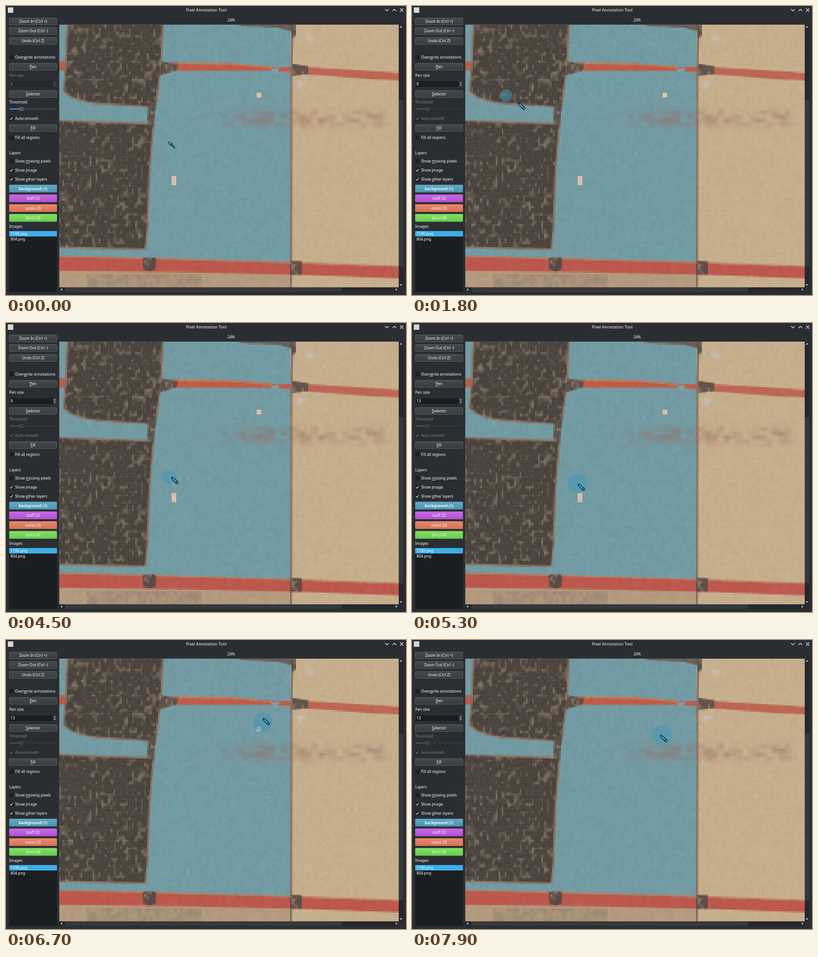
These frames come from a looping animation (879x637 px, 8000 ms). An HTML page with a canvas:

```html
<!DOCTYPE html>
<html lang="en">
<head>
<meta charset="utf-8">
<title>Pixel Annotation Tool</title>
<style>
  html, body { margin: 0; width: 100%; height: 100%; overflow: hidden; background: #2a2e32; }
  canvas, svg { position: absolute; left: 0; top: 0; }
  canvas { left: 117px; top: 41px; }
  text { font: 8.4px "Noto Sans", sans-serif; fill: #fcfcfc; }
  .title { font-size: 9px; }
  .bold { font-weight: bold; }
  .mid { text-anchor: middle; }
  .off { opacity: .4; filter: grayscale(1); }
  .line { fill: none; stroke: #fcfcfc; stroke-width: 1.2; }
</style>
</head>
<body>
<canvas id="view" width="746" height="579"></canvas>
<svg id="ui" width="879" height="637" viewBox="0 0 879 637"></svg>
<script>
const CELL = 10 / 3, LEFT = 117, TOP = 41, COLS = 224, ROWS = 174;
const $ = id => document.getElementById(id);

// ---- annotated picture ----
const hash = (x, y) => {
  const s = Math.sin(x * 127.1 + y * 311.7) * 43758.5453;
  return s - Math.floor(s);
};
const mix = (a, b, k) => a + (b - a) * k;
const clamp = v => Math.max(0, Math.min(1, v));
function noise(x, y) {
  const i = Math.floor(x), j = Math.floor(y);
  const u = x - i, v = y - j;
  return mix(mix(hash(i, j), hash(i + 1, j), u), mix(hash(i, j + 1), hash(i + 1, j + 1), u), v);
}

function paintRegions(g) {
  const fill = (color, d, edge, width) => {
    const path = new Path2D(d);
    g.fillStyle = color;
    g.fill(path);
    if (edge) stroke(edge, width, path);
  };
  const stroke = (color, width, d) => {
    g.strokeStyle = color;
    g.lineWidth = width;
    g.stroke(new Path2D(d));
  };
  g.setTransform(.3, 0, 0, .3, -LEFT * .3, -TOP * .3);
  fill('#6daab8', 'M90 20H640V640H90Z');
  fill('#eac796', 'M626 20H890V650H626Z');
  g.filter = 'blur(.5px)';
  fill('#5f4e40', 'M470 30H630V57L600 48L520 44Z');
  fill('#32281f', 'M135 30H345L341 130L328 224L300 221L200 215Q140 207 126 186L131 130Z', '#94725a', 4);
  fill('#32281f', 'M90 252L312 259L324 260L315 370L311 490L306 536L200 534L90 531Z', '#94725a', 4);
  fill('#493a2e', 'M313 218L331 205L324 266L310 262Z');
  fill('#de4a2f', 'M360 125L500 127L600 135L626 134V146L580 143L360 143Z');
  stroke('#e2874c', 3, 'M380 126L500 128L585 136');
  fill('#7fabb4', 'M581 138L600 135L597 149L584 147Z');
  fill('#de5a40', 'M655 134L760 140L880 148V165L800 161L655 150Z');
  fill('#d2503a', 'M100 122H131V142H100Z');
  fill('#4a372c', 'M338 121L378 130L374 142L338 153Z');
  fill('#583f32', 'M628 127L664 133V149L628 154Z');
  fill('#d0a880', 'M90 578L626 588V640H90Z');
  stroke('#795a45', 4, 'M630 30L627 150V300L626 640');
  fill('#4a3b30', 'M625 30H637V64L628 72Z');
  fill('#db4535', 'M90 551L300 556L626 566L890 576V601L626 592L400 587L90 583Z');
  stroke('#dc7c4c', 3, 'M90 551L300 556L626 565L890 575');
  fill('#43302a', 'M300 557Q315 550 330 557L328 581Q315 589 302 580Z');
  fill('#4d352c', 'M624 562L650 563V592H624Z');
}

function addTexture(g) {
  const img = g.getImageData(0, 0, COLS, ROWS), px = img.data;
  for (let r = 0; r < ROWS; r++) for (let c = 0; c < COLS; c++) {
    const k = (r * COLS + c) * 4, x = LEFT + c * CELL, y = TOP + r * CELL;
    const dark = px[k] < 90 && px[k + 2] < 90;
    const n = noise(c / 2, r / 2.4), grain = hash(c + 7, r + 3) - .5;
    const speck = dark ? Math.max(0, n - .57) * 190 + grain * 16 : (n - .5) * 9 + grain * 7;
    const tint = [1, .87, .68];
    const scrawl = Math.exp(-(((y - 246) / 17) ** 2)) * clamp((x - 405) / 110) * clamp((850 - x) / 30);
    const smear = scrawl * clamp(noise(c / 4, r / 3 + 40) * 1.2 - .2) * .65;
    const dirt = y > 588 && x > 175 && x < 430 ? n * .5 : 0;
    const glow = Math.exp(-((x - 665) ** 2 + (y - 66) ** 2) / 80) + Math.exp(-((x - 650) ** 2 + (y - 171) ** 2) / 90);
    [165, 98, 86].forEach((stain, i) => {
      let v = px[k + i] + speck * (dark ? tint[i] : 1);
      v = dark ? v : mix(v, stain, smear);
      v = mix(v, 120 - i * 15, dirt);
      px[k + i] = mix(v, 240, clamp(glow * n));
    });
  }
  g.putImageData(img, 0, 0);
}

function drawPicture() {
  const small = document.createElement('canvas');
  small.width = COLS;
  small.height = ROWS;
  const g = small.getContext('2d');
  paintRegions(g);
  addTexture(g);
  const v = $('view').getContext('2d');
  v.imageSmoothingEnabled = false;
  v.drawImage(small, 0, 0, COLS * CELL, ROWS * CELL);
  v.fillStyle = 'rgba(128,126,124,.62)';
  for (let c = 0; c <= COLS; c++) v.fillRect(c * CELL, 0, 1, 579);
  for (let r = 0; r <= ROWS; r++) v.fillRect(0, r * CELL, 746, 1);
}

// ---- window ----
const text = (x, y, s, cls = '') =>
  `<text x="${x}" y="${y}" class="${cls}">${s.replace(/&(.)/, '<tspan text-decoration="underline">$1</tspan>')}</text>`;
const rect = (x, y, w, h, fill, more = '') =>
  `<rect x="${x}" y="${y}" width="${w}" height="${h}" fill="${fill}" ${more}/>`;
const line = (d, more = '') => `<path class="line" d="${d}" ${more}/>`;
const button = (y, label, id = '') =>
  rect(7.5, y + .5, 104, 15, 'url(#face)', `rx="1.5" stroke="#5c6165" id="${id}"`) + text(59.5, y + 11, label, 'mid');
const layer = (y, label, color, cls = '') =>
  rect(7, y, 105, 17, color, 'rx="1.5"') + rect(7, y, 105, 17, 'url(#sheen)', 'rx="1.5"') + text(59.5, y + 11.5, label, 'mid ' + cls);
const check = (y, label, on) =>
  rect(7.5, y - 4.5, 9, 9, '#1b1e20') + (on ? line(`M9 ${y}l2 2.3l3.6-5`) : '') + text(20, y + 3, label);
const arrow = (x, y, d) => `<path transform="translate(${x} ${y})" d="${d}" fill="#c8cacc"/>`;
const hole = (col, row, w, h, id) => {
  let s = rect(LEFT + col * CELL, TOP + row * CELL, w * CELL + 1, h * CELL + 1, '#a98f80');
  for (let i = 0; i < w * h; i++)
    s += rect(LEFT + (col + i % w) * CELL + .8, TOP + (row + Math.floor(i / w)) * CELL + .8, 2.6, 2.6, '#fbdcc8');
  return `<g id="${id}">${s}</g>`;
};

$('ui').innerHTML = `
  <defs>
    <linearGradient id="face" x2="0" y2="1"><stop stop-color="#45494d"/><stop offset="1" stop-color="#383c40"/></linearGradient>
    <linearGradient id="sheen" x2="0" y2="1"><stop stop-color="#fff" stop-opacity=".08"/><stop offset="1" stop-opacity=".1"/></linearGradient>
    <clipPath id="port"><rect x="117" y="41" width="746" height="579"/></clipPath>
  </defs>
  ${rect(4, 3, 12, 12, '#d9d5d1')}
  ${text(440, 12, 'Pixel Annotation Tool', 'mid title')}
  ${line('M833 7l4 4l4-4M849.500 11l4-4l4 4M866 5.500l7 7m0-7l-7 7')}
  ${text(495, 34, '24%', 'mid')}
  ${button(26, 'Zoom In (Ctrl +)')}${button(47, 'Zoom Out (Ctrl -)')}${button(69, 'Undo (Ctrl Z)')}
  ${check(113, 'Over&write annotations')}
  ${button(126, '&Pen', 'pen')}
  <g id="penBox">
    ${text(7, 155.5, 'Pen size')}
    ${rect(7.5, 164.5, 104, 15, '#1b1e20', 'rx="1.5" stroke="#33373b"')}
    ${rect(102.5, 164.5, 9, 15, '#33373b')}
    ${arrow(107, 169, 'M-2 1.500L0-1.500L2 1.500Z')}${arrow(107, 175, 'M-2-1.500L0 1.500L2-1.500Z')}
    <text id="size" x="10" y="175"></text>
  </g>
  ${button(186, '&Selector')}
  <g id="wandBox">
    ${text(7, 215, 'Threshold')}
    ${rect(8, 226, 102, 1.5, '#484d51')}${rect(8, 226, 24, 2, '#3daee9')}
    ${rect(30.5, 223.5, 7, 7, '#4b5054', 'stroke="#777c80"')}
    ${check(248, 'Auto-smooth', true)}
  </g>
  ${button(261, '&Fill')}
  ${check(290, 'Fill all regions')}
  ${text(7, 326.500, 'Layers')}
  ${check(342, 'Show &missing pixels')}${check(362, 'Show &image', true)}${check(382, 'Show &other layers', true)}
  ${layer(394, 'background (1)', '#52a2c1', 'bold')}${layer(415.5, 'staff (2)', '#c45ae4')}
  ${layer(437, 'notes (3)', '#e97d5e')}${layer(458.5, 'lyrics (4)', '#73df57')}
  ${text(7, 488.500, 'Images')}
  ${rect(7, 496, 105, 134, '#1b1e20')}${rect(7, 496, 105, 12, '#3daee9')}
  ${text(10, 505, '1190.png')}${text(10, 517, '804.png')}
  ${rect(863, 41, 10, 579, '#24282c')}${rect(864, 208, 8, 365, '#33383c', 'stroke="#484d51" stroke-width=".6"')}
  ${rect(117, 620, 746, 10, '#24282c')}${rect(131, 621, 606, 8, '#33383c', 'stroke="#484d51" stroke-width=".6"')}
  ${arrow(868, 46, 'M-3 1.500L0-2L3 1.500Z')}${arrow(868, 615, 'M-3-1.500L0 2L3-1.500Z')}
  ${arrow(122, 625, 'M1.500-3L-2 0L1.500 3Z')}${arrow(858, 625, 'M-1.500-3L2 0L-1.500 3Z')}
  ${hole(74, 100, 3, 6, 'tallHole')}${hole(130, 45, 3, 3, 'smallHole')}
  <circle id="brush" fill="#4298b9" fill-opacity=".52" clip-path="url(#port)"/>
  <g id="wandTip">
    <path d="M5 5L14 14" stroke="#0c1820" stroke-width="3.400"/><path d="M6 6L13.500 13.500" stroke="#478fb0" stroke-width="1.200"/>
    <path d="M0 0l2 2M0 6l2-1M6 0l-1 2M0 3h2M7 4h2M4 7v2" stroke="#0c1820" stroke-width="1.300"/>
  </g>
  <g id="penTip">
    <path d="M0 0L1.500 5L10 13.500Q11.800 15 13.500 13.500Q15 11.800 13.500 10L5 1.500Z" fill="#4b9fc3" stroke="#081820" stroke-width="1.300"/>
    <path d="M8.800 12.300L12.300 8.800M0 0L2 2.200" stroke="#081820" stroke-width="1.100"/>
  </g>
  <path id="arrowTip" d="M.5.5V13L3.500 10.300L5.500 15L7.500 14L5.600 9.600H9Z" fill="#111" stroke="#fff" stroke-width=".8"/>`;

// ---- motion ----
const LOOP = 8000, LAG = 30;
const bursts = [[0, 0], [200, 800], [1000, 1000], [1200, 1400], [1700, 2000], [2300, 2600], [2900, 2900],
  [3700, 3800], [4500, 4500], [4700, 6400], [6500, 7100], [7500, 7900]];
const path = [
  [0, 357, 299], [200, 352, 308], [300, 336, 310], [450, 240, 245], [600, 140, 165], [700, 62, 140],
  [800, 79, 133], [1600, 79, 133], [1700, 112, 150], [1770, 207, 197], [1800, 234, 214],
  [1970, 315, 281], [2000, 328, 288], [2300, 345, 318], [2500, 360, 338], [2570, 360, 340],
  [2600, 364, 340], [2870, 360, 340], [2900, 363, 343], [3770, 360, 340], [3800, 364, 340],
  [4470, 360, 340], [4500, 364, 340], [5000, 363, 345], [5300, 365, 355], [5500, 366, 376],
  [5700, 369, 401], [6000, 366, 355], [6170, 368, 355], [6200, 365, 400], [6400, 367, 398],
  [6500, 400, 360], [6670, 564, 181], [6700, 565, 173], [6800, 567, 163], [7100, 560, 190],
  [7500, 560, 192], [7700, 552, 208], [7870, 549, 210], [7900, 546, 210]];

function refreshTime(t) {
  const [, end] = bursts.filter(b => b[0] <= t).pop();
  return Math.min(Math.floor(t / 100) * 100, end);
}
function pointer(t) {
  const i = path.findIndex(p => p[0] > t);
  if (i < 0) return path[path.length - 1].slice(1);
  if (i === 0) return path[0].slice(1);
  const a = path[i - 1], b = path[i], k = (t - a[0]) / (b[0] - a[0]);
  return [mix(a[1], b[1], k), mix(a[2], b[2], k)];
}
const show = (id, on) => $(id).setAttribute('visibility', on ? 'visible' : 'hidden');

function render(now) {
  const t = refreshTime(now % LOOP);
  const [x, y] = pointer(t), [cx, cy] = pointer(t - LAG);
  const penMode = t >= 1300, inside = x > LEFT;
  const size = t < 4500 ? 8 : t < 4700 ? 9 : Math.min(13, 10 + (t - 4700) / 100);

  for (const [id, on] of [['wandTip', inside && !penMode], ['penTip', inside && penMode], ['arrowTip', !inside]]) {
    show(id, on);
    $(id).setAttribute('transform', `translate(${x} ${y})`);
  }
  show('brush', inside && penMode);
  $('brush').setAttribute('cx', cx);
  $('brush').setAttribute('cy', cy);
  $('brush').setAttribute('r', size * 1.64 + .3);
  $('size').textContent = size;
  $('penBox').setAttribute('class', penMode ? '' : 'off');
  $('wandBox').setAttribute('class', penMode ? 'off' : '');
  $('pen').setAttribute('fill', t === 1200 ? '#2f3437' : 'url(#face)');
  show('tallHole', t < 5500);
  show('smallHole', t < 7500);
}

drawPicture();
const start = performance.now();
function tick() {
  render(performance.now() - start);
  requestAnimationFrame(tick);
}
tick();
</script>
</body>
</html>
```
